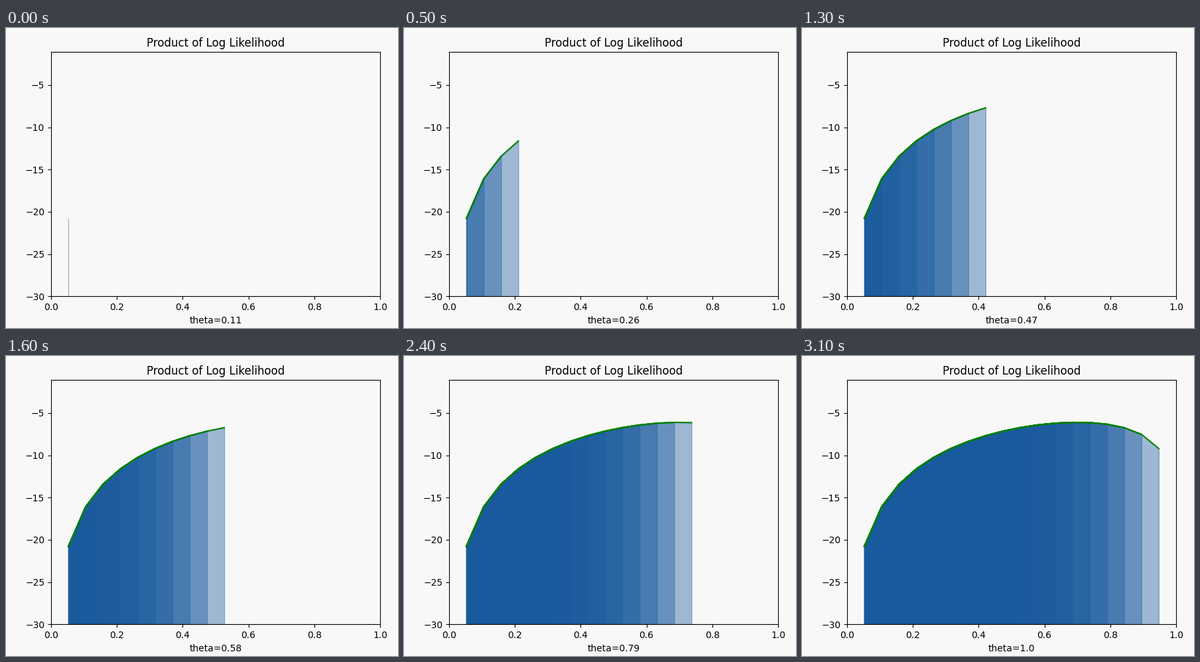
A matplotlib script that plays this animation: 591x452 px, repeating every 3700 ms.

```python
import numpy as np
import matplotlib.pyplot as plt
from matplotlib.animation import FuncAnimation

W, H, DPI = 591, 452, 100
TICK = 100                      # ms per animation frame
FLOOR = -30
BACK, BLUE = "#f8f8f8", "#185a9d"

# Log likelihood of 7 successes and 3 failures on a grid of theta
theta = np.linspace(0, 1, 20)
inner = theta[1:-1]
loglik = 7 * np.log(inner) + 3 * np.log(1 - inner)
steps = len(inner)

# Ticks each step is held; a few are shorter and the last one rests
holds = [2] * steps
for i in (2, 8, 15):
    holds[i] = 1
holds[-1] = 6
schedule = np.repeat(np.arange(steps), holds)

# The small surplus keeps the pixel size from being rounded down
fig = plt.figure(figsize=((W + 0.01) / DPI, (H + 0.01) / DPI), dpi=DPI, facecolor=BACK)
left, right, top, bottom = 68, 564, 36.3, 404.35
ax = fig.add_axes([left / W, 1 - bottom / H, (right - left) / W, (bottom - top) / H],
                  facecolor=BACK)
ax.set_xlim(0, 1)
ax.set_ylim(FLOOR, loglik.max() + 5)
ax.set_title("Product of Log Likelihood")
label = ax.set_xlabel("")

# Each step lays another translucent area and line over the earlier ones
layers = []
for n in range(1, steps + 1):
    x, y = inner[:n], loglik[:n]
    area = ax.fill_between(x, y, FLOOR, color=BLUE, alpha=0.4)
    line, = ax.plot(x, y, color="green", lw=1.5)
    layers.append((area, line))


def draw(frame):
    step = schedule[frame]
    for i, layer in enumerate(layers):
        for artist in layer:
            artist.set_visible(i <= step)
    label.set_text(f"theta={round(float(theta[step + 2]), 2)}")
    return []


anim = FuncAnimation(fig, draw, frames=len(schedule), interval=TICK,
                     init_func=lambda: draw(0), repeat=True, repeat_delay=0)
plt.show()
```
